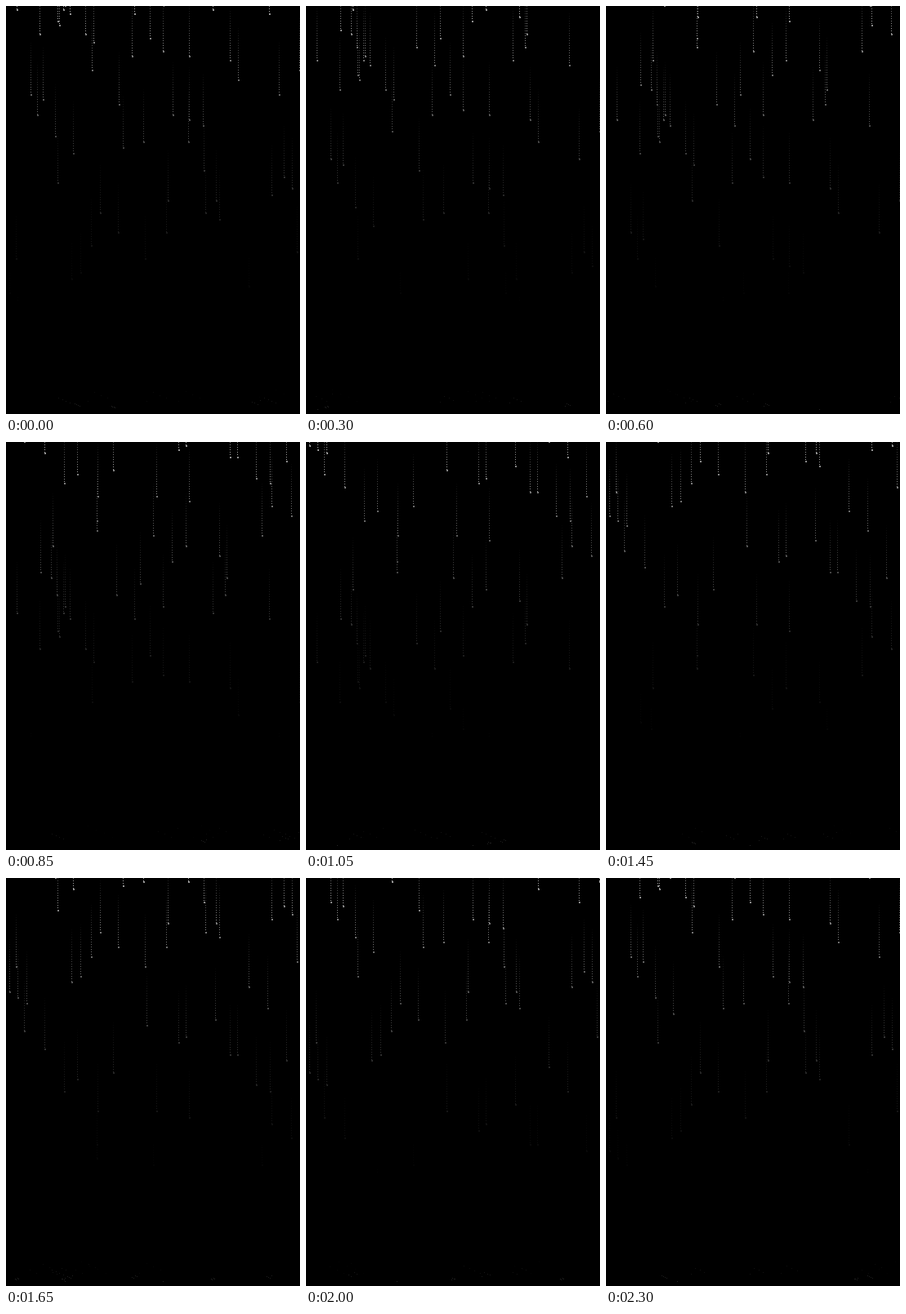
Animation of 360 by 500 pixels, one loop 2.35 s. Source, as an HTML page with a canvas:

```html
<!DOCTYPE html>
<html lang="en">
<head>
<meta charset="utf-8">
<title>Rain</title>
<style>
  html, body { margin: 0; width: 100%; height: 100%; overflow: hidden; background: #000; }
  canvas { display: block; }
</style>
</head>
<body>
<canvas id="stage" width="360" height="500"></canvas>
<script>
const ctx = document.getElementById('stage').getContext('2d');
const STEP = 50;          // ms per picture
const STEPS = 47;         // pictures per loop
const SPEED = 9.4;        // px per step at the top
const GRAVITY = 0.147;
const LANDING = 33;       // steps from top to ground
const SPLASH_LIFE = 5;
const TAIL = 68;
const PITCH = 3;          // spacing of the tail dots
const FADE_DEPTH = 390;   // drops are invisible below this

// Columns where drops appear, one row per half step
const spawns = [
  [72, 192], [], [62, 135, 268], [], [164], [55, 270], [42], [],
  [203], [261], [], [57, 220], [], [180, 313], [111], [],
  [111], [349], [], [325], [224], [112, 184], [], [],
  [71, 323], [306], [87], [131], [], [343], [274, 283], [47],
  [211], [220], [22], [172], [256], [], [320], [25],
  [14], [4], [297], [80], [91], [], [12, 170], [356],
  [104], [], [137, 196], [], [261], [115, 244], [], [198, 257],
  [325], [350], [63], [340], [242], [], [], [82],
  [143], [168, 223], [60], [], [241], [224], [38, 204], [],
  [138], [45], [30, 334], [], [], [284], [], [105, 359],
  [], [274], [154, 224], [192], [], [107], [176], [41, 97],
  [], [65], [63], [], [78, 157, 322], [13, 70, 253]
];
const drops = spawns.flatMap((columns, i) => columns.map(x => ({ x, birth: i / 2 })));

function dot(x, y, size, light) {
  const level = Math.round(255 * light);
  if (level < 4) return;
  ctx.fillStyle = `rgb(${level},${level},${level})`;
  ctx.fillRect(x, y, size, size);
}

function drawDrop(x, age) {
  const head = Math.round(SPEED * age + GRAVITY * age * age);
  const light = 0.75 * Math.max(0, 1 - head / FADE_DEPTH) ** 1.5;
  const first = Math.ceil(Math.max(0, head - TAIL) / PITCH) * PITCH;
  for (let y = first; y < head; y += PITCH) {
    dot(x, y, 1, light * (1 - (head - y) / TAIL));
  }
  dot(x, head - 1, 2, light * 0.8);
}

function drawSplash(x, age) {
  const light = 0.14 * (1 - age / SPLASH_LIFE);
  for (let i = 0; i < 4; i++) {
    const drift = (i - 1.5) * 2.2;
    const rise = 5 + (i * 7 + x) % 4;
    dot(Math.round(x + drift * age), Math.round(494 - rise * age + 0.6 * age * age), 1, light);
  }
}

function render(now) {
  const step = Math.floor(now / STEP) % STEPS;
  ctx.fillStyle = '#000';
  ctx.fillRect(0, 0, 360, 500);
  for (const { x, birth } of drops) {
    const age = (step - birth + STEPS) % STEPS;
    if (age < LANDING) drawDrop(x, age);
    else if (age < LANDING + SPLASH_LIFE) drawSplash(x, age - LANDING);
  }
}

const start = performance.now();
function tick() {
  render(performance.now() - start);
  requestAnimationFrame(tick);
}
tick();
</script>
</body>
</html>
```
